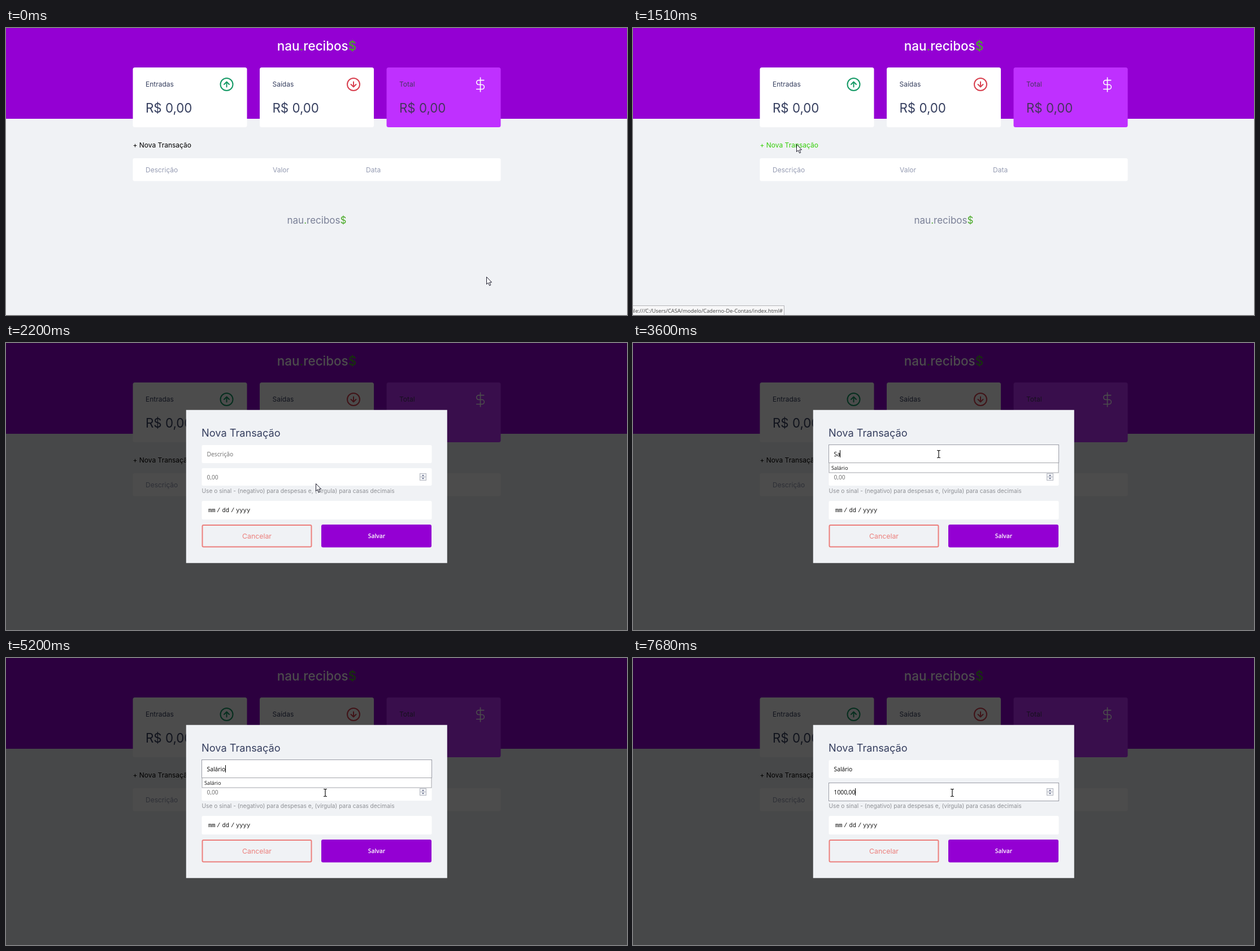
Write an HTML page that moves like this. It is 1099 px wide and 509 px high and loops after 8000 ms.

```html
<!DOCTYPE html>
<html lang="pt-BR">
<head>
<meta charset="utf-8">
<title>Controle de transações</title>
<style>
  html, body { margin: 0; width: 100%; height: 100%; overflow: hidden; }
  svg { display: block; width: 100vw; height: 100vh; }
  text { font: 400 12px Inter, sans-serif; white-space: pre; }
  .brand { font-size: 22.4px; font-weight: 500; fill: #fff; }
  .foot { font-size: 17px; fill: #7a8097; }
  .green { fill: #49aa26; }
  .label { fill: #363f5f; }
  .value { font-size: 22.3px; fill: #363f5f; }
  .total { fill: #45355f; }
  .muted { fill: #969cb3; }
  .hover { fill: #35cf0a; }
  .ui { font: 10.3px "Open Sans", sans-serif; }
  .mono { font: 10.5px "Liberation Mono", monospace; }
  .small { font: 9.3px "Open Sans", sans-serif; }
  .hint { font-size: 10.2px; fill: #8e9095; }
  .line { fill: none; stroke-width: 2; stroke-linecap: round; stroke-linejoin: round; }
  .focus { fill: none; stroke: #9a9ca6; }
</style>
</head>
<body>
<svg viewBox="0 0 1099 509" preserveAspectRatio="none">
  <rect width="1099" height="509" fill="#f0f2f5"/>
  <rect width="1099" height="161" fill="#9400d3"/>
  <text class="brand" x="550" y="40" text-anchor="middle">nau<tspan class="green">.</tspan>recibos<tspan class="green">$</tspan></text>

  <g fill="#fff">
    <rect x="224.5" y="70" width="202" height="106" rx="3.5"/>
    <rect x="449" y="70" width="202" height="106" rx="3.5"/>
    <rect x="673.5" y="70" width="202" height="106" rx="3.5" fill="#bf30ff"/>
    <rect x="224.5" y="231" width="651" height="40.5" rx="3"/>
  </g>
  <text class="label" x="247" y="104">Entradas</text>
  <text class="label" x="471.5" y="104">Saídas</text>
  <text class="total" x="696" y="104">Total</text>
  <text class="value" x="247" y="150">R$ 0,00</text>
  <text class="value" x="471.5" y="150">R$ 0,00</text>
  <text class="value total" x="696" y="150">R$ 0,00</text>
  <g class="line" stroke="#159a66" transform="translate(390.5 100)">
    <circle r="11"/><path d="M0 4.5V-4.5M-4.5 0L0-4.5 4.5 0"/>
  </g>
  <g class="line" stroke="#d8404f" transform="translate(615 100)">
    <circle r="11"/><path d="M0-4.5V4.5M-4.5 0L0 4.5 4.5 0"/>
  </g>
  <path class="line" stroke="#fff" style="stroke-width:1.4" transform="translate(825.9 86.9) scale(1.136)"
    d="M12 1V23M17.5 5H9.5a3.5 3.5 0 0 0 0 7h5a3.5 3.5 0 0 1 0 7H6"/>

  <text id="link" x="224.5" y="211.5">+ Nova Transação</text>
  <text class="muted" x="247" y="255.5">Descrição</text>
  <text class="muted" x="472" y="255.5">Valor</text>
  <text class="muted" x="637" y="255.5">Data</text>
  <text class="foot" x="550" y="346.5" text-anchor="middle">nau<tspan class="green">.</tspan>recibos<tspan class="green">$</tspan></text>

  <rect id="shade" width="1099" height="509" opacity=".7"/>

  <g id="status">
    <rect x="-1" y="492.5" width="268.5" height="18" fill="#f7f7f8" stroke="#b4b4b8"/>
    <text class="small" x="265" y="505" text-anchor="end" fill="#444">file:///C:/Users/CASA/modelo/Caderno-De-Contas/index.html#</text>
  </g>

  <g id="modal">
    <rect x="318.75" y="118.75" width="462" height="271.5" fill="#f0f2f5"/>
    <text x="346" y="166" fill="#363f5f" style="font-size:18.2px">Nova Transação</text>
    <g fill="#fff">
      <rect x="346.5" y="181" width="407" height="32" rx="2.5"/>
      <rect x="346.5" y="222" width="407" height="31" rx="2.5"/>
      <rect x="346.5" y="280" width="407" height="33" rx="2.5"/>
    </g>
    <text class="ui" id="name" x="355.5" y="201"></text>
    <text class="ui" id="amount" x="355.5" y="242"></text>
    <g stroke="#b3b7c0" fill="#f1f2f5">
      <rect x="732.5" y="231.5" width="11" height="6"/>
      <rect x="732.5" y="237.5" width="11" height="6"/>
      <path d="M736 235.8l2-2.3 2 2.3zM736 239.2l2 2.3 2-2.3z" fill="#4a5578" stroke="none"/>
    </g>
    <text class="hint" x="346.5" y="266">Use o sinal - (negativo) para despesas e, (vírgula) para casas decimais</text>
    <g fill="#111">
      <text class="mono" x="358" y="300">mm</text><text class="mono" x="373" y="300">/</text>
      <text class="mono" x="382.5" y="300">dd</text><text class="mono" x="398" y="300">/</text>
      <text class="mono" x="407" y="300">yyyy</text>
    </g>
    <rect x="347.5" y="323" width="193" height="38.5" rx="2" fill="none" stroke="#ec7f7c" stroke-width="2"/>
    <text x="444" y="346.5" text-anchor="middle" fill="#ec7f7c" style="font-size:12.3px">Cancelar</text>
    <rect x="558" y="322" width="195" height="40.5" rx="3" fill="#9400d3"/>
    <text class="ui" x="656" y="346" text-anchor="middle" fill="#fff" style="font-weight:600">Salvar</text>

    <rect id="focusName" class="focus" x="346.5" y="180.5" width="407" height="32"/>
    <rect id="focusAmount" class="focus" x="346.5" y="221.5" width="407" height="32"/>
    <g id="suggest">
      <rect x="347" y="212.5" width="406" height="17.5" fill="#fff" stroke="#a2a4aa"/>
      <text class="small" x="351" y="225" fill="#111">Salário</text>
    </g>
    <rect id="caret" width="1" height="13" fill="#000"/>
  </g>

  <path id="arrow" d="M.5.5V13.5L3.5 10.8 5.6 15.8 7.8 14.9 5.7 10H9.6Z" fill="#fff" stroke="#1c1c2c"/>
  <path id="beam" d="M-3-6.5H-1L0-5.5 1-6.5H3M0-5.5V5.5M-3 6.5H-1L0 5.5 1 6.5H3" fill="none" stroke="#111" stroke-width="1.2"/>
</svg>
<script>
const LOOP = 8000;
const $ = id => document.getElementById(id);
const caret = $('caret');

// [start, end, number of steps, waypoints]
const moves = [
  [70, 800, 10, [[850, 441], [640, 330], [400, 200], [300, 168], [271, 203]]],
  [950, 1300, 5, [[271, 203], [289, 206]]],
  [1890, 2670, 11, [[289, 206], [419, 222], [577, 255], [585, 304], [556, 240], [541, 197]]],
  [4830, 5150, 5, [[541, 197], [556, 253], [565, 239]]]
];

// [time, text]
const nameKeys = [[0, ''], [3370, 'S'], [3600, 'Sa'], [3780, 'Sal'], [3960, 'Salá'],
  [4060, 'Salár'], [4210, 'Salári'], [4360, 'Salário']];
const amountKeys = [[0, ''], [5820, '1'], [6130, '10'], [6360, '100'], [6910, '1000'],
  [7070, '1000,'], [7530, '1000,0'], [7680, '1000,00']];
const caretOff = [[3140, 3370], [4670, 4830], [6850, 6910], [7460, 7530]];

const within = (t, a, b) => t >= a && t < b;
const latest = (keys, t) => keys.filter(k => k[0] <= t).pop()[1];
const show = (id, on) => { $(id).style.display = on ? '' : 'none'; };

function along(points, p) {
  const s = p * (points.length - 1);
  const i = Math.min(Math.floor(s), points.length - 2);
  return points[i].map((v, axis) => v + (points[i + 1][axis] - v) * (s - i));
}

function pointer(t) {
  const move = moves.filter(m => m[0] <= t).pop();
  if (!move) return moves[0][3][0];
  const [start, end, steps, points] = move;
  const step = Math.floor((t - start) / (end - start) * (steps - 1)) + 1;
  return along(points, Math.min(1, step / steps));
}

function setField(id, text, placeholder) {
  const el = $(id);
  el.textContent = text || placeholder;
  el.setAttribute('fill', text ? '#000' : '#6c6c6c');
}

function draw(t) {
  const open = t >= 1590;
  show('shade', open);
  show('modal', open);
  $('link').setAttribute('class', within(t, 730, 1590) ? 'hover' : '');
  show('status', within(t, 950, 1660));
  $('status').setAttribute('opacity', open ? 0.5 : 1);

  const name = latest(nameKeys, t), amount = latest(amountKeys, t);
  setField('name', name, 'Descrição');
  setField('amount', amount, '0,00');

  const onName = within(t, 2670, 5290), onAmount = t >= 5290;
  show('focusName', onName);
  show('focusAmount', onAmount);
  show('suggest', within(t, 3460, 5290));
  show('caret', (onName || onAmount) && !caretOff.some(([a, b]) => within(t, a, b)));
  const typed = onAmount ? amount : name;
  const width = open && typed ? $(onAmount ? 'amount' : 'name').getComputedTextLength() : 0;
  caret.setAttribute('x', Math.round(355 + width));
  caret.setAttribute('y', onAmount ? 231 : 190);

  const [x, y] = pointer(t).map(Math.round);
  const beam = t >= 2500;
  show('beam', beam);
  show('arrow', !beam);
  $(beam ? 'beam' : 'arrow').setAttribute('transform', `translate(${x} ${y})`);
}

const begin = performance.now();
function tick() {
  draw((performance.now() - begin) % LOOP);
  requestAnimationFrame(tick);
}
tick();
</script>
</body>
</html>
```
